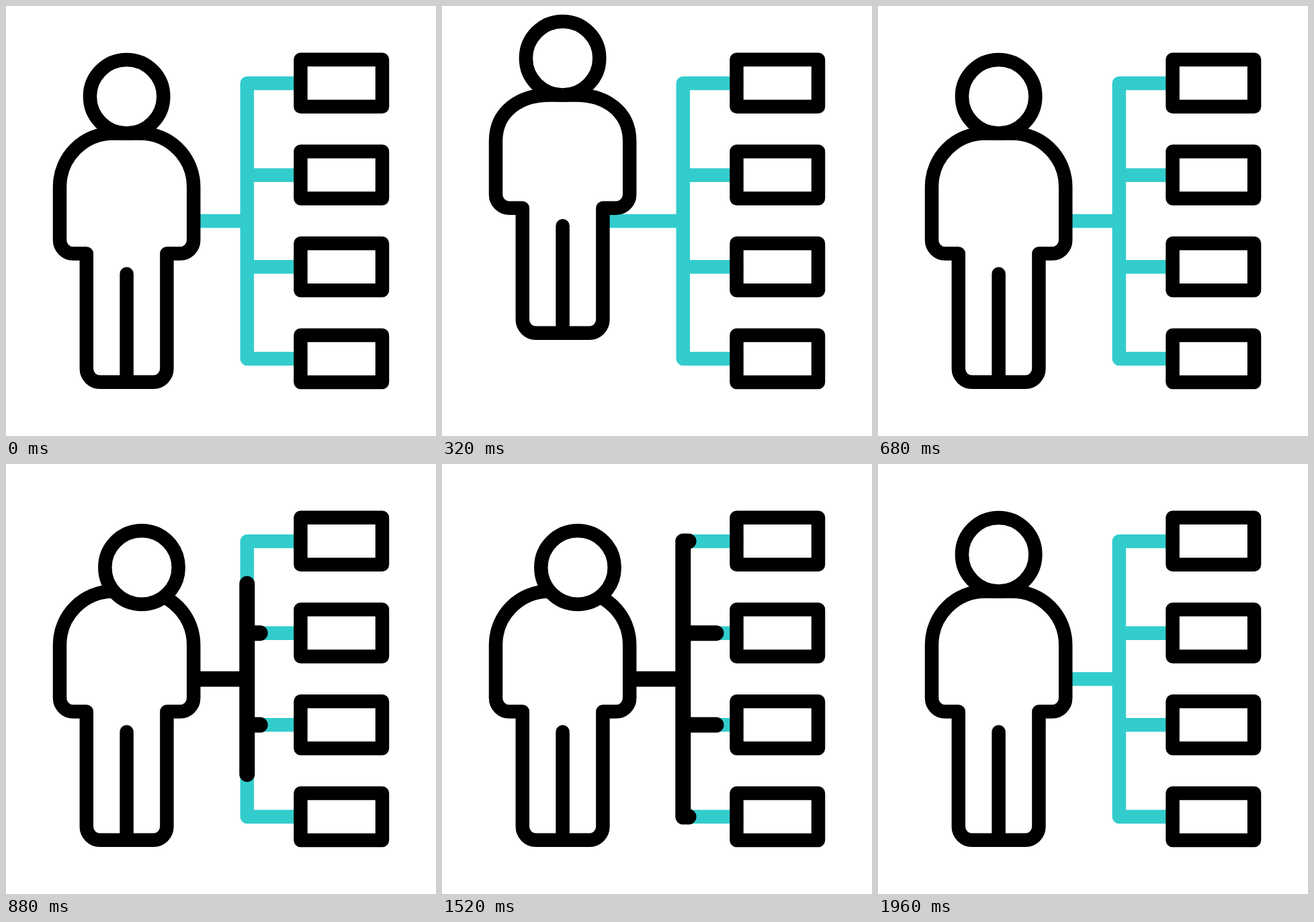
An HTML page for the animation above (2000 ms loop, 640 px wide and 640 px high).

```html
<!DOCTYPE html>
<html lang="en">
<head>
<meta charset="utf-8">
<title>Person and branches</title>
<style>
  html, body { margin: 0; width: 100%; height: 100%; overflow: hidden; background: #fff; }
  svg { display: block; width: 100vw; height: 100vh; }
  path, circle { fill: none; stroke: #000; stroke-width: 20.5; stroke-linecap: round; stroke-linejoin: round; }
  #wires { stroke: #3cc; }
  #flow { stroke-width: 23; }
  #body, #head { fill: #fff; }
</style>
</head>
<body>
<svg viewBox="0 0 640 640">
  <path id="wires"/>
  <path id="flow"/>
  <path id="boxes"/>
  <path id="body"/>
  <path id="leg"/>
  <circle id="head" r="54.7"/>
</svg>
<script>
const LOOP = 2000, STEP = 40, BEAT = 200;
const CENTER = 179.6, HAND_X = 279.2, NODE = 358.8, MID_Y = 320;
const BOX_X = 438.5, GAP = 136.7, RISE = GAP * 1.5, ARM = 78.4;

const el = id => document.getElementById(id);
const setPath = (id, d) => el(id).setAttribute('d', d);

// Smooth step from 0 to 1 between two times.
function ease(t, from, to) {
  const u = Math.min(1, Math.max(0, (t - from) / (to - from)));
  return u * u * (3 - 2 * u);
}
const pulse = (t, inA, inB, outA, outB) => ease(t, inA, inB) - ease(t, outA, outB);
const hop = (t, from) => pulse(t, from, from + BEAT, from + BEAT, from + 2 * BEAT);

// Left half is written out; the right half is its mirror.
function bodyPath(top, hand, foot) {
  const elbow = hand - 99.6, k = 44, r = 20;
  const x = (side, offset) => CENTER + side * offset;
  const half = side => `M${CENTER} ${top}H${x(side, 19.9)}
    C${x(side, 19.9 + k)} ${top} ${x(side, 99.6)} ${elbow - k} ${x(side, 99.6)} ${elbow}
    V${hand - r}A${r} ${r} 0 0 ${side < 0 ? 0 : 1} ${x(side, 99.6 - r)} ${hand}H${x(side, 59.8)}
    V${foot - r}A${r} ${r} 0 0 ${side < 0 ? 0 : 1} ${x(side, 59.8 - r)} ${foot}H${CENTER}`;
  return half(-1) + half(1);
}

function wiresPath() {
  const branches = [-1, 1].map(dir =>
    `M${NODE} ${MID_Y}v${dir * RISE}H${BOX_X}M${NODE} ${MID_Y + dir * GAP / 2}H${BOX_X}`);
  return `M240 ${MID_Y}H${NODE}` + branches.join('');
}

function flowPath(t) {
  const link = pulse(t, 680, 770, 1760, 1960);
  const main = pulse(t, 760, 1000, 1400, 1770);
  const side = pulse(t, 815, 1015, 1400, 1690);
  let d = link > 0 ? `M${HAND_X} ${MID_Y}H${HAND_X + (NODE - HAND_X) * link}` : '';
  for (const dir of [-1, 1]) {
    const len = main * (RISE + ARM);
    if (len > 0) d += `M${NODE} ${MID_Y}v${dir * Math.min(len, RISE)}`;
    if (len > RISE) d += `h${len - RISE}`;
    if (side > 0 && len > GAP / 2) d += `M${NODE} ${MID_Y + dir * GAP / 2}h${ARM * side}`;
  }
  return d;
}

function boxesPath(width) {
  let d = '';
  for (let i = 0; i < 4; i++) d += `M${BOX_X} ${79.8 + i * GAP}h${width}v70h${-width}Z`;
  return d;
}

function draw(t) {
  const up = hop(t, 80), down = hop(t, 280);
  const shift = (lift, dip) => dip * down - lift * up;
  const top = shift(65.5, 17), foot = 559.8 + shift(81.5, 0);
  const look = pulse(t, 680, 880, 1640, 1840);

  setPath('body', bodyPath(189.5 + top, 368.6 + shift(78.3, 21), foot));
  setPath('leg', `M${CENTER} ${398.8 + shift(83.7, 33.5)}V${foot}`);
  el('head').setAttribute('cx', CENTER + 22.4 * look);
  el('head').setAttribute('cy', 134.7 + 19.3 * look + top);
  setPath('flow', flowPath(t));
  setPath('boxes', boxesPath(121.5 + 15.8 * hop(t, 960)));
}

setPath('wires', wiresPath());
const start = performance.now();
function tick() {
  const t = (performance.now() - start) % LOOP;
  draw(Math.floor(t / STEP) * STEP);
  requestAnimationFrame(tick);
}
tick();
</script>
</body>
</html>
```
